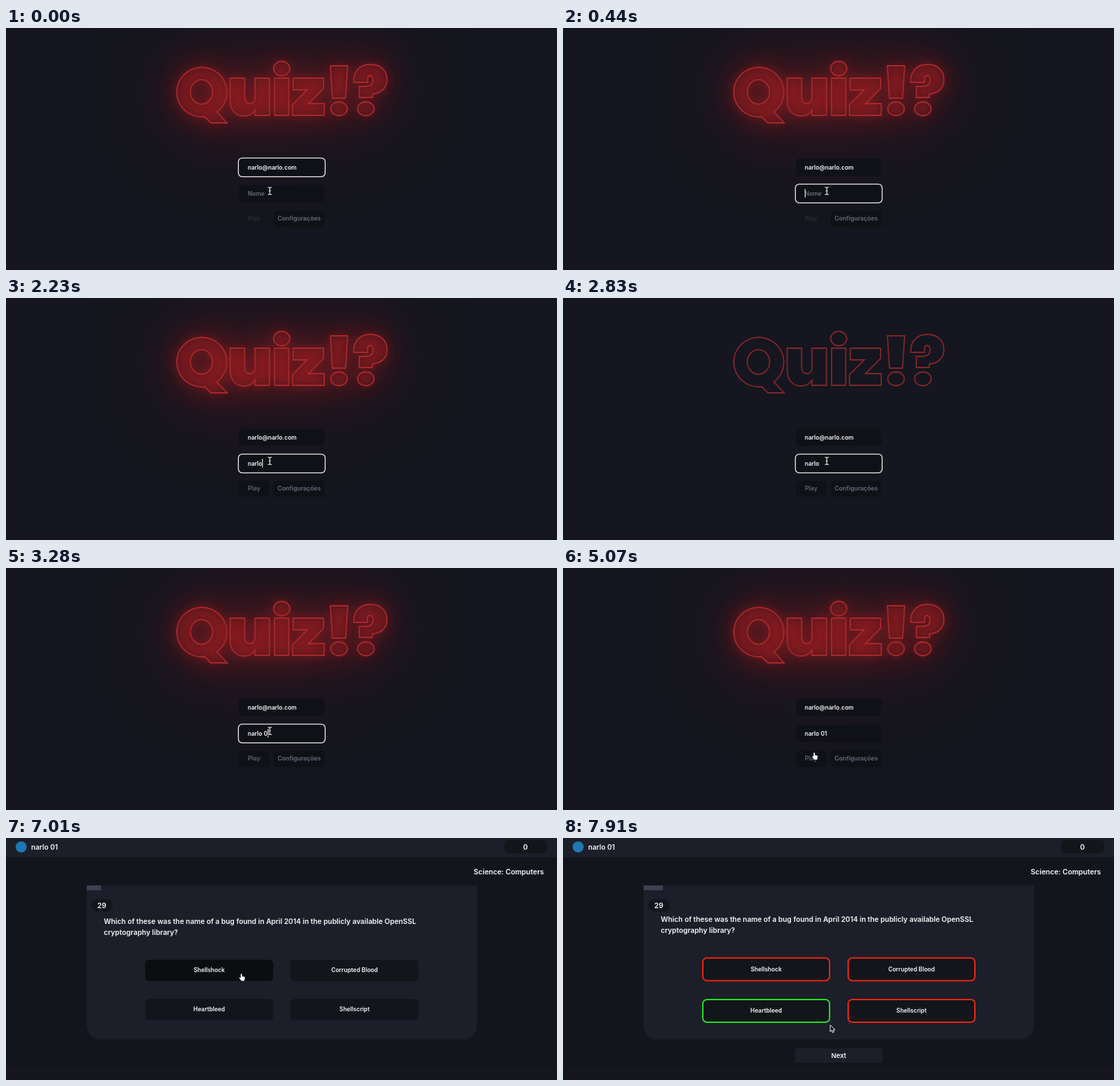
An HTML page with a canvas that plays this animation: 800x352 px, repeating every 8000 ms.

```html
<!DOCTYPE html>
<html lang="pt">
<head>
<meta charset="utf-8">
<title>Quiz!?</title>
<style>
  html, body { margin: 0; width: 100%; height: 100%; overflow: hidden; background: #15161f; }
  canvas { display: block; width: 800px; height: 352px; }
</style>
</head>
<body>
<canvas id="stage" width="800" height="352"></canvas>
<script>
const W = 800, H = 352, LOOP = 8000, STEP = 149.2;
const ctx = document.getElementById('stage').getContext('2d');
const EMAIL = 'narlo@narlo.com', PLAYER = 'narlo 01';

const ellipse = (x, y, rx, ry) =>
  `M${x - rx} ${y}A${rx} ${ry} 0 1 1 ${x + rx} ${y}A${rx} ${ry} 0 1 1 ${x - rx} ${y}Z`;

// Outlines of the word "Quiz!?"
const title = new Path2D([
  'M306 122.1L321 138H297.5L288.5 129A36.3 36 0 1 1 306 122.1Z',
  ellipse(283.8, 93, 16.2, 17.8),
  'M325.5 73H346.5V101C346.5 107 349.5 110 354 110C358.5 110 361.5 107 361.5 101V73H382.5V127H361.5V119.5C358 125 353 128 346 128C333 128 325.5 119 325.5 105Z',
  'M390 73H410.5V127H390Z',
  ellipse(400.3, 59, 11.7, 10.5),
  'M417 73H461V88L439 110H462V127H416V111.5L437.5 90H417Z',
  'M471 55H496L493 102H474Z',
  ellipse(483.5, 117.5, 12, 10),
  'M513 101V85H521C530 85 533 81 533 76C533 71 531 69 528.5 69C525.5 69 524.5 72 525 79H505C504 62 515 53 529 53C544 53 553 62 553 75C553 88 544 95 532 96V101Z',
  ellipse(522.5, 117.5, 12, 10)
].join(''));

const glow = makeGlow();

function makeGlow() {
  const layer = document.createElement('canvas');
  layer.width = W;
  layer.height = H;
  const g = layer.getContext('2d');
  g.translate(-1000, 0);
  g.shadowOffsetX = 1000;
  for (const [blur, alpha] of [[160, .35], [80, .35], [40, .35], [16, .3], [4, .15]]) {
    g.shadowBlur = blur;
    g.shadowColor = `rgba(205,34,36,${alpha})`;
    g.fill(title, 'evenodd');
  }
  return layer;
}

function box(x, y, w, h, r, fill, stroke, width) {
  ctx.beginPath();
  ctx.roundRect(x, y, w, h, r);
  if (fill) { ctx.fillStyle = fill; ctx.fill(); }
  if (stroke) { ctx.strokeStyle = stroke; ctx.lineWidth = width; ctx.stroke(); }
}

function text(str, x, y, size, align = 'left', color = '#f8f8fa') {
  ctx.font = `600 ${size}px Inter, sans-serif`;
  ctx.textAlign = align;
  ctx.fillStyle = color;
  ctx.fillText(str, x, y);
}

const within = (t, a, b) => t >= a && t < b;
const inside = (px, py, x, y, w, h) => px >= x && px <= x + w && py >= y && py <= y + h;

// Last value whose start time has passed
function at(t, keys) {
  let value = keys[0][1];
  for (const [start, v] of keys) if (t >= start) value = v;
  return value;
}

const route = [
  [0, 383, 237], [3600, 383, 237], [3880, 402, 240], [4170, 411, 262],
  [4460, 388, 273], [4620, 365, 271], [5230, 365, 271], [5810, 374, 314],
  [6110, 374, 314], [6700, 342, 200], [7610, 342, 200], [7890, 388, 272]
];

function pointerAt(t) {
  const i = route.findIndex(p => p[0] > t);
  if (i < 0) return route[route.length - 1].slice(1);
  const [t0, x0, y0] = route[i - 1], [t1, x1, y1] = route[i];
  const u = (t - t0) / (t1 - t0), e = u * u * (3 - 2 * u);
  return [x0 + (x1 - x0) * e, y0 + (y1 - y0) * e];
}

const shapes = {
  arrow: new Path2D('M0 0V9.6L2.2 7.6L3.7 11L5.4 10.2L4 7H7Z'),
  hand: new Path2D('M-1.2 -1.5C-1.2 -2.8 .7 -2.8 .7 -1.5V1.2L3.8 1.8C4.8 2 5 2.7 4.8 3.6L4 7.8H-.4L-3.2 3.8C-3.6 2.6 -2.4 2.2 -1.2 3.5Z'),
  beam: new Path2D('M-2.8 -5.3Q0 -5.3 0 -4Q0 -5.3 2.8 -5.3M0 -4V4M-2.8 5.3Q0 5.3 0 4Q0 5.3 2.8 5.3M-1.6 0H1.6')
};

function outline(path, color, width) {
  ctx.strokeStyle = color;
  ctx.lineWidth = width;
  ctx.stroke(path);
}

function drawPointer(kind, x, y) {
  const path = shapes[kind];
  ctx.save();
  ctx.translate(x, y);
  ctx.lineJoin = 'round';
  if (kind === 'arrow') {
    ctx.fillStyle = '#0b0b0d';
    ctx.fill(path);
    outline(path, '#f2f2f2', 1);
  } else if (kind === 'hand') {
    outline(path, '#0b0b0d', 1.6);
    ctx.fillStyle = '#fff';
    ctx.fill(path);
  } else {
    outline(path, '#0b0b0d', 2.6);
    outline(path, '#e9e9e9', 1.2);
  }
  ctx.restore();
}

function drawTitle(level) {
  ctx.globalAlpha = level;
  ctx.drawImage(glow, 0, 0);
  ctx.globalAlpha = 1;
  ctx.lineJoin = 'miter';
  outline(title, level ? '#a6292b' : '#80262b', 1.8);
}

function field(y, focus) {
  box(338, y, 124.5, 25, 5, '#0f1116');
  ctx.globalAlpha = focus;
  if (focus) box(337.4, y - .9, 126, 27.2, 5.5, null, '#eef0ec', 1.3);
  ctx.globalAlpha = 1;
}

function login(t) {
  ctx.fillStyle = '#15161f';
  ctx.fillRect(0, 0, W, H);
  drawTitle(at(t, [[0, 1], [140, 0], [290, 1], [1190, .85], [1340, 1], [2830, 0], [2980, 1]]));

  field(190, at(t, [[0, 1], [290, .4], [440, 0]]));
  field(228, at(t, [[0, 0], [290, .6], [440, 1], [4770, .5], [4920, 0]]));
  text(EMAIL, 351, 205.8, 8.5);

  const typed = at(t, [[0, 0], [1040, 1], [1190, 2], [1340, 3], [1630, 4],
                       [2230, 5], [3130, 6], [3280, 7], [3430, 8]]);
  const name = PLAYER.slice(0, typed);
  if (typed) text(name, 351, 243.6, 8.5);
  else text('Nome', 351, 243.6, 8.5, 'left', '#6d6e74');
  const caretOn = [[290, 740], [1040, 2080], [2230, 2830], [3130, 3870], [4320, 4770]]
    .some(([a, b]) => within(t, a, b));
  if (caretOn) {
    ctx.fillStyle = '#f4f4f6';
    ctx.fillRect(Math.round(351 + ctx.measureText(name).width), 234, 1, 12.5);
  }

  box(338, 266, 44.5, 23, 5, typed ? '#0f1116' : '#14151d');
  box(389, 266, 73.5, 23, 5, '#0f1116');
  text('Play', 360.3, 280.2, 8.8, 'center', typed ? '#606474' : '#2b2d38');
  text('Configurações', 425.7, 280.2, 8.8, 'center', '#686c7b');
}

function quiz(t, px, py) {
  const done = t >= 7460, avatar = t >= 6260;
  ctx.fillStyle = '#12151b';
  ctx.fillRect(0, 0, W, H);
  ctx.fillStyle = '#15161e';
  ctx.fillRect(0, 332, W, 20);
  ctx.fillStyle = '#1c1e29';
  ctx.fillRect(0, 0, W, 28);
  box(723, 3, 63, 19, 7, '#12151a');
  text('0', 754.2, 16.8, 10.4, 'center');
  if (avatar) {
    ctx.beginPath();
    ctx.arc(22, 13, 8, 0, 7);
    ctx.fillStyle = '#1e78b4';
    ctx.fill();
  }
  text(PLAYER, avatar ? 36.5 : 21, 16.8, 10.2);
  if (t < 5960) return;

  text('Science: Computers', 781, 52.6, 10.4, 'right');
  box(117, 69, 567, 224, [0, 0, 20, 20], '#1c1e29');
  const elapsed = Math.min(t - 5905, 1485) / 1000;
  ctx.fillStyle = '#3f4152';
  ctx.fillRect(117, 69, 567 * elapsed / 30, 7);
  box(124, 89, 31, 18, 9, '#12151a');
  text(t >= 7010 ? '29' : '30', 139, 101.8, 10.4, 'center');

  const top = done ? 121.5 : 125.3;
  text('Which of these was the name of a bug found in April 2014 in the publicly available OpenSSL', 142, top, 10.3);
  text('cryptography library?', 142, top + 16, 10.3);

  ['Shellshock', 'Corrupted Blood', 'Heartbleed', 'Shellscript'].forEach((label, i) => {
    const x = i % 2 ? 413 : 202, row = i >> 1;
    const y = row ? 234 : done ? 173.5 : 177, h = done ? 35 : 31;
    const hover = inside(px, py, x, y, 186, h);
    const edge = done && (i === 2 ? '#1fe21f' : '#ee2412');
    const pad = done ? 1 : 0;
    box(x + pad, y + pad, 186 - 2 * pad, h - 2 * pad, 6, hover ? '#0b0d11' : '#12151a', edge, 2);
    text(label, x + 93, y + h / 2 + 2.7, 8.5, 'center');
  });

  if (done) {
    box(337, 306, 127, 21, 4, '#1c1e29');
    text('Next', 400.3, 320, 9.6, 'center');
  }
}

function pointerKind(onQuiz, x, y) {
  if (onQuiz) {
    const option = inside(x, y, 202, 174, 185, 34) || inside(x, y, 202, 234, 185, 34);
    return option ? 'hand' : 'arrow';
  }
  if (y < 255) return 'beam';
  return inside(x, y, 338, 266, 124, 23) ? 'hand' : 'arrow';
}

function draw(now) {
  const t = now % LOOP;
  const held = Math.floor((t + 12) / STEP) * STEP;
  const [x, y] = pointerAt(held);
  const onQuiz = t >= 5370;
  if (onQuiz) quiz(held, x, y);
  else login(t);
  drawPointer(pointerKind(onQuiz, x, y), x, y);
}

const start = performance.now();
function frame() {
  draw(performance.now() - start);
  requestAnimationFrame(frame);
}
frame();
</script>
</body>
</html>
```
